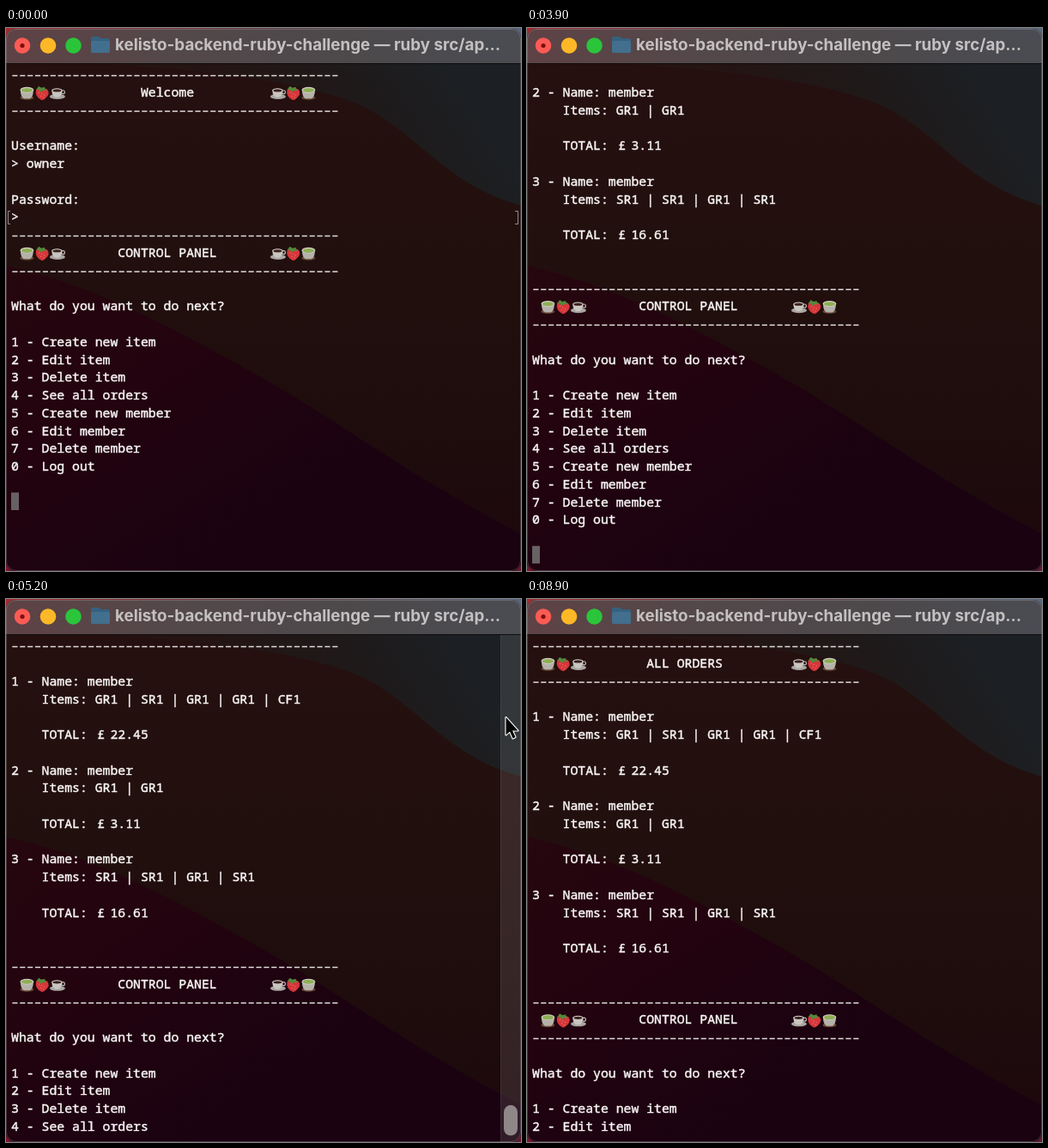
These frames come from a looping animation (600 px wide and 633 px high, 9000 ms). An HTML page with a canvas:

```html
<!DOCTYPE html>
<html lang="en">
<head>
<meta charset="utf-8">
<title>Terminal</title>
<style>
  html, body { margin: 0; width: 100%; height: 100%; overflow: hidden; background: #2a1015; }
  canvas { display: block; }
</style>
</head>
<body>
<canvas id="stage" width="600" height="633"></canvas>
<script>
const ctx = document.getElementById('stage').getContext('2d');
const LOOP = 9000, ROWS = 28, LEFT = 6, TOP = 55, COL = 8.88, ROW = 20.77;
const MONO = '500 14.8px "Noto Sans Mono", "DejaVu Sans Mono", monospace';
const INK = '#f8f5f5';

const RULE = '-'.repeat(43);
const header = (title, col) => [RULE, '@' + ' '.repeat(col - 1) + title, RULE, ''];
const order = (n, items, total) =>
  [`${n} - Name: member`, '    Items: ' + items.join(' | '), '', `    TOTAL: £ ${total}`, ''];
const panel = [
  ...header('CONTROL PANEL', 14),
  'What do you want to do next?', '',
  '1 - Create new item', '2 - Edit item', '3 - Delete item', '4 - See all orders',
  '5 - Create new member', '6 - Edit member', '7 - Delete member', '0 - Log out', ''
];
const login = [
  ...header('Welcome', 17),
  'Username:', '> owner', '', 'Password:', '>', ...panel
];
const orders = [
  ...header('ALL ORDERS', 15),
  ...order(1, ['GR1', 'SR1', 'GR1', 'GR1', 'CF1'], '22.45'),
  ...order(2, ['GR1', 'GR1'], '3.11'),
  ...order(3, ['SR1', 'SR1', 'GR1', 'SR1'], '16.61'),
  '', ...panel
];

function fill(style, path) {
  ctx.fillStyle = style;
  ctx.fill(path);
}
function stroke(style, width, path) {
  ctx.strokeStyle = style;
  ctx.lineWidth = width;
  ctx.stroke(path);
}
function box(x, y, w, h, r = 0) {
  const p = new Path2D();
  p.roundRect(x, y, w, h, r);
  return p;
}
function oval(x, y, rx, ry = rx) {
  const p = new Path2D();
  p.ellipse(x, y, rx, ry, 0, 0, 7);
  return p;
}
function gradient(x0, y0, x1, y1, ...colors) {
  const g = ctx.createLinearGradient(x0, y0, x1, y1);
  colors.forEach((c, i) => g.addColorStop(i / (colors.length - 1), c));
  return g;
}

function wallpaper() {
  fill(gradient(0, 42, 0, 633, '#25100f', '#22100e', '#1f0d0d', '#1c080d'), box(0, 0, 600, 633));
  fill(gradient(300, 170, 520, 30, '#241412', '#1f1919', '#1c2024'),
    new Path2D('M120 42 C240 50 345 62 410 89 C475 117 510 182 600 207 V42Z'));
  fill(gradient(0, 275, 230, 633, '#26070f', '#22030f', '#1a0210'),
    new Path2D('M0 277 C100 299 190 347 290 403 S450 510 600 590 V633 H0Z'));
}

function titleBar() {
  fill(gradient(0, 0, 600, 0, '#5e4245', '#53484a', '#4d494b', '#4a4c52'), box(0, 0, 600, 41));
  fill('#100c0d', box(0, 41, 600, 1));
  fill('#fc5b54', oval(19, 20.5, 9.3));
  fill('#7d100c', oval(19, 20.5, 2.6));
  fill('#fdb827', oval(49, 20.5, 9.3));
  fill('#2bc53c', oval(78.5, 20.5, 9.3));
  fill('#35617e', box(99, 10, 11, 8, 2));
  fill('#35617e', box(99, 12, 22, 17, 2));
  fill('#426f8d', box(99, 15, 22, 14, 2));
  ctx.font = '700 18.8px Inter, "Open Sans", sans-serif';
  ctx.fillStyle = '#c4c0c1';
  ctx.fillText('kelisto-backend-ruby-challenge — ruby src/ap…', 127, 20.5);
}

function tea(x, y) {
  fill('#6b4a35', oval(x + 9, y + 5.6, 8, 2.4));
  fill('#b5b1aa', new Path2D(`M${x + 1.5} ${y - 3.5} h15 q0 8 -4 10 h-7 q-4 -2 -4 -10`));
  fill('#d2d0c8', oval(x + 9, y - 3.5, 7.8, 3.4));
  fill('#8fae55', oval(x + 9, y - 3.3, 6.6, 2.5));
}
function coffee(x, y) {
  fill('#aaa6a2', oval(x + 9, y + 4.2, 9, 3));
  stroke('#bcb8b4', 1.2, oval(x + 15.5, y - 1, 2, 2));
  fill('#c9c5c1', new Path2D(`M${x + 2.5} ${y - 3} h12 q0 6 -4 8 h-4 q-4 -2 -4 -8`));
  fill('#d8d5d2', oval(x + 8.5, y - 3, 6.2, 2.4));
  fill('#3a2019', oval(x + 8.5, y - 2.8, 5, 1.6));
}
function strawberry(x, y) {
  fill('#d6363a', new Path2D(`M${x + 2} ${y - 4} q7 -4 13 0 q4 5 -2 10 q-3 3 -5 2 q-8 -4 -6 -12`));
  fill('#4f8b3c', new Path2D(`M${x + 2} ${y - 4} l3 -4 3 2 4 -1 0 2 3 2 -5 0 -3 2 -2 -3z`));
  ctx.fillStyle = '#e98d7c';
  for (let i = 0; i < 5; i++) ctx.fillRect(x + 5 + i * 3 % 7, y - 1 + i * 1.4, 1, 1);
}
function icons(x, y, ...list) {
  list.forEach((icon, i) => icon(x + i * 2 * COL, y));
}

const colX = col => LEFT + col * COL;
const rowY = row => TOP + row * ROW;

// A hairline outline gives the type its heavier terminal weight.
function type(text, x, y) {
  ctx.fillStyle = ctx.strokeStyle = INK;
  ctx.lineWidth = 0.45;
  ctx.fillText(text, x, y);
  ctx.strokeText(text, x, y);
}

function textLine(line, row) {
  const y = rowY(row);
  if (line === RULE) {
    ctx.fillStyle = '#dedada';
    for (let i = 0; i < RULE.length; i++) ctx.fillRect(colX(i) + 1.3, y - 0.2, 6.2, 1.5);
    return;
  }
  type(line.replace(/[@£]/g, ' '), LEFT, y);
  if (line.includes('£')) type('£', colX(11) + 2.5, y);
  if (line[0] === '@') {
    icons(colX(1) + 0.5, y, tea, strawberry, coffee);
    icons(colX(34), y, coffee, strawberry, tea);
  }
}

function prompt(row, typed) {
  type(typed, LEFT, rowY(row));
  fill('#686164', box(colX(typed.length), rowY(row) - 12, 9, 20.5));
}

function brackets() {
  stroke('#91898b', 1, new Path2D('M5 213.5 H2.5 V228.5 H5 M593 213.5 H596.5 V228.5 H593'));
}

function scrollbar(offset) {
  fill('rgba(255,255,255,.1)', box(576, 42, 24, 591));
  fill('rgba(255,255,255,.06)', box(576, 42, 1, 591));
  fill('#8f8688', box(580, 588.5 + offset * 0.8, 16, 35.5, 8));
}

function pointer() {
  const arrow = new Path2D('M582.5 138 V158.5 L587 154.5 L590.5 162.5 L593.5 161 L590 153.5 H596.5Z');
  ctx.lineJoin = 'round';
  stroke('#fff', 2.2, arrow);
  fill('#000', arrow);
}

function draw(t) {
  const listed = t >= 2200;
  const lines = listed ? orders : login;
  const scroll = Math.min(1, Math.max(0, (t - 4900) / 400));
  const offset = listed ? Math.round(8 * (1 - scroll)) : 0;

  fill(gradient(0, 0, 600, 0, '#a32c32', '#5f3a40', '#56687f'), box(0, 0, 600, 633));
  fill(gradient(0, 0, 600, 0, '#7d1630', '#551426', '#66182f'), box(0, 400, 600, 233));
  ctx.save();
  ctx.clip(box(0, 1, 600, 632, 11));
  wallpaper();
  ctx.textBaseline = 'middle';
  ctx.font = MONO;
  lines.slice(offset, offset + ROWS).forEach(textLine);
  const promptRow = lines.length - offset;
  if (promptRow < ROWS) prompt(promptRow, !listed && t >= 1900 ? '4' : '');
  if (!listed) brackets();
  if (t >= 4200 && t < 7700) scrollbar(offset);
  titleBar();
  ctx.restore();
  stroke('rgba(190,180,183,.27)', 1, box(0.5, 1.5, 599, 631, 11));
  if (t >= 4200 && t < 6600) pointer();
}

function tick() {
  draw(performance.now() % LOOP);
  requestAnimationFrame(tick);
}
tick();
</script>
</body>
</html>
```
